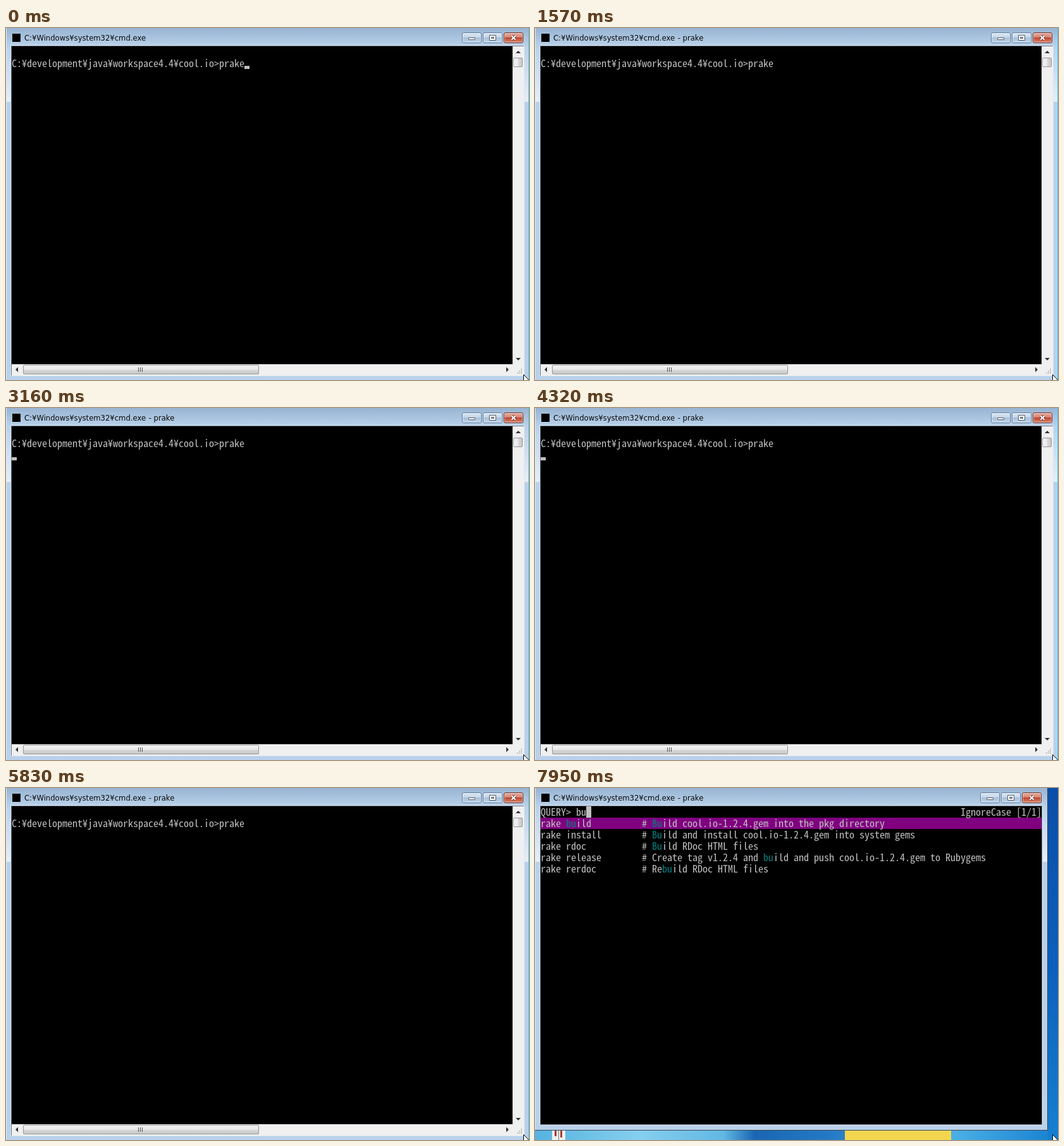
Animation of 827 by 558 pixels, one loop 8 s. Source, as an HTML page:

```html
<!DOCTYPE html>
<html lang="en">
<head>
<meta charset="utf-8">
<title>Console</title>
<style>
  html, body { margin: 0; width: 100%; height: 100%; overflow: hidden; background: #b9d1ea; }
  svg { display: block; width: 827px; height: 558px; }
  rect, .crisp { shape-rendering: crispEdges; }
  .soft rect { shape-rendering: auto; }
  .title { font: 11.62px "DejaVu Sans", Verdana, sans-serif; fill: #0a0a0a; }
  .con {
    font: 300 16px "Noto Sans Mono CJK JP", "Noto Sans Mono", monospace;
    letter-spacing: calc(8px - 1ch);
    font-variant-ligatures: none;
    fill: #c0c0c0;
  }
  .con .hit { fill: #008080; }

  .shell, .picker, .running, .all, .filtered, .caret { animation: 8s step-end infinite; }
  .shell { animation-name: shell; }
  .picker { animation-name: picker; }
  .running { animation-name: running; }
  .all { animation-name: all; }
  .filtered { animation-name: filtered; }
  .caret { animation-name: caret; }

  @keyframes shell { 0% { opacity: 1 } 78%, 100% { opacity: 0 } }
  @keyframes picker { 0% { opacity: 0 } 78%, 100% { opacity: 1 } }
  @keyframes running { 0% { opacity: 0 } 10.875%, 100% { opacity: 1 } }
  @keyframes all { 0% { opacity: 1 } 99.375%, 100% { opacity: 0 } }
  @keyframes filtered { 0% { opacity: 0 } 99.375%, 100% { opacity: 1 } }
  /* caret blinks after the command, then on the empty line below */
  @keyframes caret {
    0% { opacity: 1; transform: translate(377px, 60px) }
    1.875% { opacity: 0; transform: translate(377px, 60px) }
    7.375% { opacity: 1; transform: translate(385px, 60px) }
    10.875% { opacity: 0; transform: translate(9px, 78px) }
    14.25%, 26.5%, 39.5%, 54%, 65.875% { opacity: 1; transform: translate(9px, 78px) }
    19.625%, 33.625%, 46.875%, 59.25%, 72.875%, 100% { opacity: 0; transform: translate(9px, 78px) }
  }
</style>
</head>
<body>
<svg viewBox="0 0 827 558" xmlns="http://www.w3.org/2000/svg">
  <defs>
    <linearGradient id="bar" x2="0" y2="1">
      <stop offset="0" stop-color="#98b4d2"/><stop offset="1" stop-color="#b9d1ea"/>
    </linearGradient>
    <linearGradient id="sheen" x2="0" y2="1">
      <stop offset="0" stop-color="#b9d1ea"/><stop offset="1" stop-color="#e6eff8"/>
    </linearGradient>
    <linearGradient id="btn" x2="0" y2="1">
      <stop offset="0" stop-color="#dde8f4"/><stop offset=".48" stop-color="#c3d5e8"/>
      <stop offset=".5" stop-color="#a9c0d9"/><stop offset="1" stop-color="#c0d5ea"/>
    </linearGradient>
    <linearGradient id="red" x2="0" y2="1">
      <stop offset="0" stop-color="#e9b0a2"/><stop offset=".48" stop-color="#d6806c"/>
      <stop offset=".5" stop-color="#bf4630"/><stop offset="1" stop-color="#d98a70"/>
    </linearGradient>
    <linearGradient id="thumbV">
      <stop offset="0" stop-color="#f5f5f5"/><stop offset=".5" stop-color="#e8e8e8"/>
      <stop offset=".51" stop-color="#d8d8d8"/><stop offset="1" stop-color="#c8c8c8"/>
    </linearGradient>
    <linearGradient id="thumbH" x2="0" y2="1">
      <stop offset="0" stop-color="#f5f5f5"/><stop offset=".5" stop-color="#e8e8e8"/>
      <stop offset=".51" stop-color="#d8d8d8"/><stop offset="1" stop-color="#c8c8c8"/>
    </linearGradient>
    <linearGradient id="skyV" x2="0" y2="1">
      <stop offset="0" stop-color="#0b4ea6"/><stop offset=".5" stop-color="#0c5fbc"/>
      <stop offset="1" stop-color="#1680d0"/>
    </linearGradient>
    <linearGradient id="skyH">
      <stop offset="0" stop-color="#55b3e0"/><stop offset=".2" stop-color="#86cfee"/>
      <stop offset=".36" stop-color="#62b8e4"/><stop offset=".42" stop-color="#1a66b2"/>
      <stop offset=".56" stop-color="#2479c4"/><stop offset=".8" stop-color="#4bb0e6"/>
      <stop offset="1" stop-color="#1680d0"/>
    </linearGradient>
    <g id="buttons" class="soft">
      <g stroke="#5f7c9c">
        <rect x="721.5" y="7.5" width="30" height="16" rx="2.5" fill="url(#btn)"/>
        <rect x="754.5" y="7.5" width="30" height="16" rx="2.5" fill="url(#btn)"/>
        <rect x="787.5" y="7.5" width="30" height="16" rx="2.5" fill="url(#red)" stroke="#6b2c26"/>
      </g>
      <g fill="none" stroke="#fff" stroke-opacity=".5">
        <rect x="722.5" y="8.5" width="28" height="14" rx="1.5"/>
        <rect x="755.5" y="8.5" width="28" height="14" rx="1.5"/>
        <rect x="788.5" y="8.5" width="28" height="14" rx="1.5"/>
      </g>
      <g fill="#fff" stroke="#535b68">
        <rect x="731.5" y="15.5" width="10" height="3" rx=".5"/>
        <path d="M764.5 11.5h10v8h-10zM767.5 14.5v2h4v-2z" fill-rule="evenodd"/>
      </g>
      <path d="M799.5 12.5l6 6m0-6l-6 6" stroke="#6b3a38" stroke-width="4"/>
      <path d="M799.5 12.5l6 6m0-6l-6 6" stroke="#fff" stroke-width="2.2"/>
    </g>
    <rect id="icon" x="10" y="9" width="13" height="13"/>
  </defs>

  <g class="shell">
    <rect width="827" height="558" fill="#b9d1ea"/>
    <rect width="827" height="28" fill="url(#bar)"/>
    <rect y="28" width="8" height="89" fill="url(#sheen)"/>
    <rect x="820" y="28" width="7" height="89" fill="url(#sheen)"/>
    <rect width="1" height="558" fill="#dcebf8"/>
    <rect x="826" width="1" height="558" fill="#45c8ee"/>
    <rect x="7" y="27" width="813" height="525" fill="#dbe7f4"/>
    <rect x="8" y="28" width="811" height="523" fill="#65717f"/>
    <rect x="9" y="29" width="810" height="522" fill="#f0f0f0"/>
    <rect x="9" y="29" width="792" height="504" fill="#000"/>
    <use href="#icon"/>
    <text class="title" x="29" y="20">C:¥Windows¥system32¥cmd.exe<tspan class="running" id="job"></tspan></text>
    <text class="title running" x="222" y="20" xml:space="preserve"> - prake</text>
    <use href="#buttons"/>
    <g class="soft" stroke="#979797">
      <rect x="802.5" y="47.5" width="14" height="14" rx="1.5" fill="url(#thumbV)"/>
      <rect x="27.5" y="534.5" width="372" height="14" rx="1.5" fill="url(#thumbH)"/>
    </g>
    <path class="crisp" d="M209.5 538v7M212.5 538v7M215.5 538v7" stroke="#555"/>
    <path d="M806 40l4-4 4 4zM806 523l4 4 4-4zM19 537.5l-4 4 4 4zM791 537.5l4 4-4 4z" fill="#333"/>
    <path class="crisp" d="M814 540h2v2h-2zM811 543h2v2h-2zM814 543h2v2h-2zM808 546h2v2h-2zM811 546h2v2h-2zM814 546h2v2h-2z" fill="#bfbfbf"/>
    <g class="con" id="prompt"></g>
    <rect class="caret" width="8" height="5" fill="#c0c0c0"/>
  </g>

  <g class="picker">
    <rect width="827" height="558" fill="url(#skyH)"/>
    <rect x="811" width="16" height="558" fill="url(#skyV)"/>
    <rect x="490" y="390" width="168" height="168" fill="#f4d64e"/>
    <rect x="27" y="543" width="21" height="15" fill="#eef0f0"/>
    <path class="crisp" d="M31 543h3v9h-3zM40 543h3v11h-3z" fill="#a83a34"/>
    <path class="crisp" d="M37.5 543v15" stroke="#777"/>

    <rect width="811" height="543" fill="#3c4856"/>
    <rect width="810" height="542" fill="#b9d1ea"/>
    <rect width="810" height="28" fill="url(#bar)"/>
    <rect y="28" width="8" height="89" fill="url(#sheen)"/>
    <rect x="802" y="28" width="8" height="89" fill="url(#sheen)"/>
    <rect width="1" height="542" fill="#dcebf8"/>
    <rect x="7" y="27" width="796" height="508" fill="#dbe7f4"/>
    <rect x="8" y="28" width="794" height="506" fill="#65717f"/>
    <rect x="9" y="29" width="792" height="504" fill="#000"/>
    <use href="#icon"/>
    <text class="title" x="29" y="20">C:¥Windows¥system32¥cmd.exe</text>
    <text class="title" x="222" y="20" xml:space="preserve"> - prake</text>
    <use href="#buttons" x="-17"/>
    <rect x="9" y="47" width="792" height="18" fill="#800080"/>
    <g class="con" id="head"></g>
    <g class="con all" id="all"><rect x="65" y="29" width="8" height="18"/></g>
    <g class="con filtered" id="filtered"><rect x="81" y="29" width="8" height="18"/></g>
  </g>

  <path d="M818.5 549.5v17l4-4 3 6 2-1-3-6h5.5z" fill="#fff" stroke="#000"/>
</svg>
<script>
  const NS = 'http://www.w3.org/2000/svg';
  const CELL = 8, LINE = 18;

  // Places each word on the character grid; "bu" may be coloured.
  function put(id, row, col, str, mark) {
    const text = document.createElementNS(NS, 'text');
    text.setAttribute('y', 29 + row * LINE + 15);
    for (const part of str.split(mark ? /(¥|\s+|bu)/i : /(¥|\s+)/)) {
      if (part.trim()) {
        const span = document.createElementNS(NS, 'tspan');
        span.setAttribute('x', 9 + col * CELL);
        span.textContent = part;
        if (mark && /^bu$/i.test(part)) span.setAttribute('class', 'hit');
        text.append(span);
      }
      col += part.length;
    }
    document.getElementById(id).append(text);
  }

  const tasks = [
    ['build', 'Build cool.io-1.2.4.gem into the pkg directory'],
    ['clean', 'Remove any temporary products'],
    ['clobber', 'Remove any generated file'],
    ['clobber_rdoc', 'Remove RDoc HTML files'],
    ['install', 'Build and install cool.io-1.2.4.gem into system gems'],
    ['rcov', 'Run RSpec code examples'],
    ['rdoc', 'Build RDoc HTML files'],
    ['release', 'Create tag v1.2.4 and build and push cool.io-1.2.4.gem to Rubygems'],
    ['rerdoc', 'Rebuild RDoc HTML files'],
    ['spec', 'Run RSpec code examples'],
    ['spec:valgrind', 'run specs with valgrind']
  ].map(([name, note]) => ('rake ' + name).padEnd(20) + '# ' + note);

  put('prompt', 1, 0, 'C:¥development¥java¥workspace4.4¥cool.io>prake');
  put('head', 0, 0, 'QUERY>');
  put('head', 0, 83, 'IgnoreCase [1/1]');
  tasks.forEach((line, i) => put('all', i + 1, 0, line));
  put('filtered', 0, 7, 'bu');
  tasks.filter(line => /bu/i.test(line))
    .forEach((line, i) => put('filtered', i + 1, 0, line, true));
</script>
</body>
</html>
```
